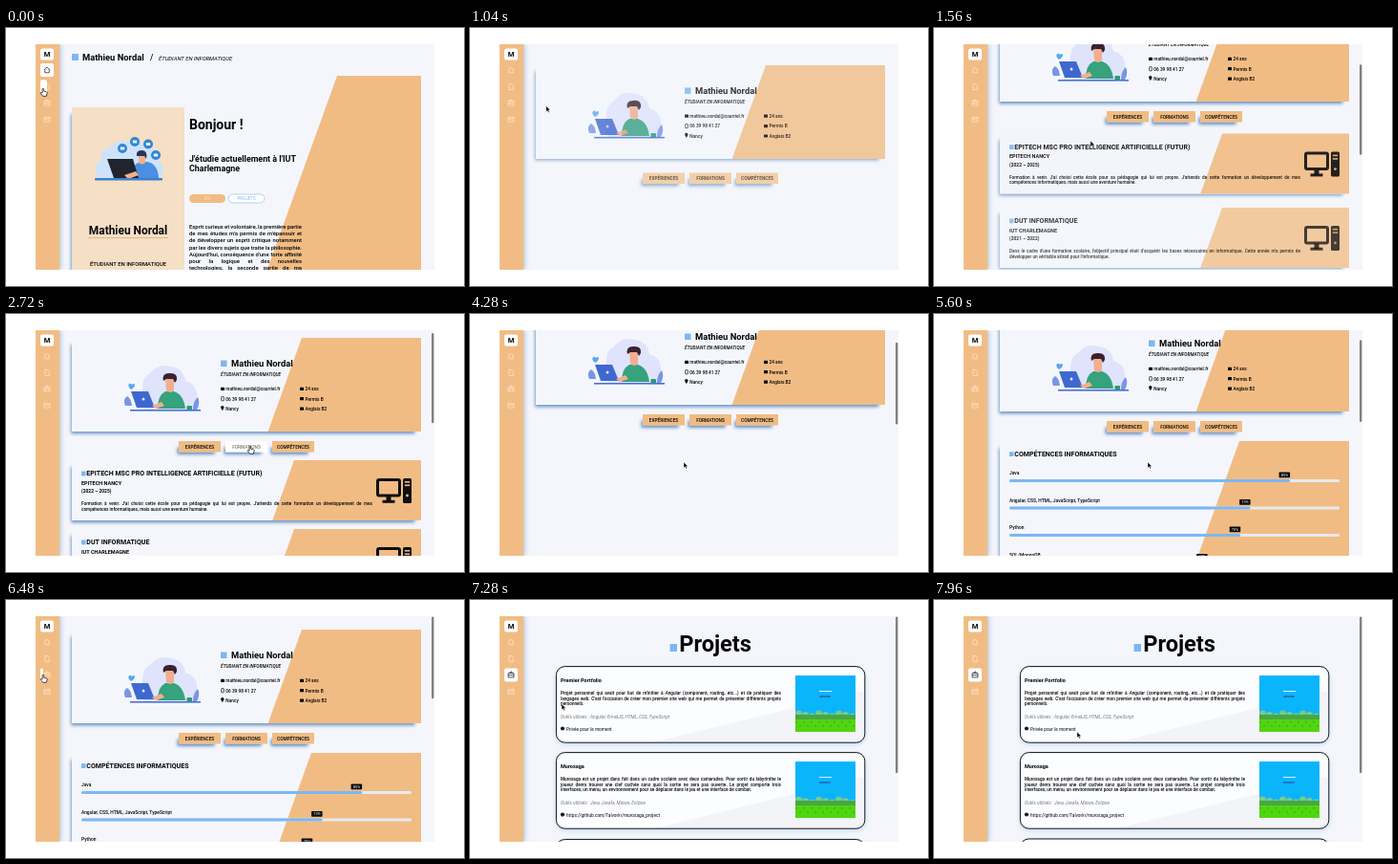
An HTML page with a canvas for the animation above (8 s loop, 480 px wide and 270 px high).

```html
<!DOCTYPE html>
<html lang="fr">
<head>
<meta charset="utf-8">
<title>Portfolio</title>
<style>
  html, body { margin: 0; width: 100%; height: 100%; overflow: hidden; background: #fff; }
  canvas { display: block; width: 480px; height: 270px; }
</style>
</head>
<body>
<canvas id="stage"></canvas>
<script>
const LOOP = 8000;
const ORANGE = '#f1bc83', BLUE = '#7cb7f3', PAPER = '#f4f6fb', INK = '#040506';
const NAME = 'Mathieu Nordal', ROLE = 'ÉTUDIANT EN INFORMATIQUE';
const OPEN_CV = 880, OPEN_SKILLS = 3400, OPEN_PROJECTS = 6800;

const canvas = document.getElementById('stage');
const ctx = canvas.getContext('2d');
const ratio = window.devicePixelRatio || 1;
canvas.width = 480 * ratio;
canvas.height = 270 * ratio;

// Motion: [time, value...] keys joined by smooth steps.
const CURSOR = [[0, 39, 63], [520, 39, 63], [850, 39, 64], [1350, 164, 118], [1700, 164, 118],
  [2450, 256, 138], [2900, 256, 138], [3250, 301, 137], [3500, 301, 137], [4100, 224, 155],
  [5800, 224, 155], [6440, 39, 78], [6950, 39, 78], [7600, 150, 138], [8000, 150, 138]];
const SCROLL = [[0, 0], [1340, 0], [1560, 52], [1700, 52], [2140, 6], [3600, 6], [4240, 34],
  [4400, 34], [4950, 48], [5560, 27], [5640, 27], [6200, 0], [8000, 0]];

const clamp = v => Math.max(0, Math.min(1, v));
const easeOut = p => 1 - (1 - clamp(p)) ** 3;

function track(keys, t) {
  const i = Math.max(1, keys.findIndex(k => k[0] >= t));
  const a = keys[i - 1], b = keys[i];
  const p = clamp((t - a[0]) / (b[0] - a[0]));
  const s = p * p * (3 - 2 * p);
  return a.slice(1).map((v, n) => v + (b[n + 1] - v) * s);
}

// Drawing helpers
function rect(x, y, w, h, color) {
  ctx.fillStyle = color;
  ctx.fillRect(x, y, w, h);
}

function round(x, y, w, h, r, fill, stroke, line = 1) {
  ctx.beginPath();
  ctx.roundRect(x, y, w, h, r);
  if (fill) { ctx.fillStyle = fill; ctx.fill(); }
  if (stroke) { ctx.strokeStyle = stroke; ctx.lineWidth = line; ctx.stroke(); }
}

function shape(path, fill, stroke, line = 1) {
  const p = new Path2D(path);
  if (fill) { ctx.fillStyle = fill; ctx.fill(p); }
  if (stroke) { ctx.strokeStyle = stroke; ctx.lineWidth = line; ctx.stroke(p); }
}

function dot(x, y, r, color) {
  ctx.beginPath();
  ctx.arc(x, y, r, 0, 7);
  ctx.fillStyle = color;
  ctx.fill();
}

function text(str, x, y, size, { style = '400', color = INK, align = 'left' } = {}) {
  ctx.font = `${style} ${size}px Roboto, sans-serif`;
  ctx.fillStyle = color;
  ctx.textAlign = align;
  ctx.fillText(str, x, y);
}

function paragraph(lines, x, y, width, size, leading, openEnd = true) {
  const style = '500';
  lines.forEach((line, i) => {
    const baseline = y + i * leading;
    if (openEnd && i === lines.length - 1) return text(line, x, baseline, size, { style });
    const words = line.split(' ');
    ctx.font = `${style} ${size}px Roboto, sans-serif`;
    const widths = words.map(w => ctx.measureText(w).width);
    const gap = (width - widths.reduce((a, b) => a + b)) / (words.length - 1);
    let left = x;
    words.forEach((w, n) => { text(w, left, baseline, size, { style }); left += widths[n] + gap; });
  });
}

function shadowed(draw, color, dx, dy, blur) {
  ctx.save();
  ctx.shadowColor = color;
  ctx.shadowOffsetX = dx * ratio;
  ctx.shadowOffsetY = dy * ratio;
  ctx.shadowBlur = blur * ratio;
  draw();
  ctx.restore();
}

// A box whose shadow falls to the lower left; nothing is painted beneath it,
// so it stays clean while it fades in.
function raised(x, y, w, h, fill) {
  ctx.save();
  const outside = new Path2D();
  outside.rect(x - 20, y - 20, w + 40, h + 40);
  outside.rect(x, y, w, h);
  ctx.clip(outside, 'evenodd');
  shadowed(() => rect(x, y + 4, w - 5, h - 4, '#86add6'), 'rgba(70,120,180,.8)', -1.5, 2.5, 3.5);
  ctx.restore();
  rect(x, y, w, h, fill);
}

function slant(edge, y, h) {
  shape(`M${edge} ${y}H435V${y + h}H${edge - h * 0.361}Z`, ORANGE);
}

function panel(y, h, edge) {
  raised(69, y, 366, h, PAPER);
  slant(edge, y, h);
}

function fadeUp(t, start, draw) {
  const e = easeOut((t - start) / 400);
  if (e <= 0) return;
  ctx.save();
  ctx.globalAlpha = e;
  ctx.translate(0, 37 * (1 - e));
  draw();
  ctx.restore();
}

// Home
function deskScene() {
  shape('M97 157q-8-12 3-19q-2-11 9-13q6-9 16-6q14-4 22 5q14 2 13 15q8 6 2 18z', '#cfe2fb');
  [[122, 126], [135, 119], [149, 121.5], [157, 133]].forEach(([x, y]) => {
    dot(x, y, 5, '#2f86d6');
    rect(x - 2.2, y - 1.5, 4.4, 3, '#e8f3ff');
  });
  shape('M132 157q0-15 9-17h7q11 2 12 17z', '#4b8fe2');
  shape('M139 133h7v8q-4 3-7 0z', '#f2b08c');
  shape('M137 134q-1-6 5-6q7 0 5 9l-2-3z', '#27355c');
  shape('M106 137h27l6 20h-26z', '#20242f');
  shape('M124 154l12-4 3 4-11 4z', '#f2b08c');
  round(93, 157, 71, 2.5, 1, '#3c7fd0');
}

function home() {
  slant(347, 50, 203);
  rect(69, 27, 7, 7, BLUE);
  text(NAME, 80, 33.7, 9.36, { style: '700' });
  text('/', 151, 33.7, 8.5, { style: '500' });
  text(ROLE, 160, 33.6, 5.87, { style: 'italic 400' });

  raised(69, 83, 118, 180, '#f5dfc5');
  deskScene();
  text(NAME, 128, 216, 11.9, { style: '700', align: 'center' });
  rect(86, 219.4, 84, 0.7, '#d8a56c');
  text(ROLE, 128, 249.2, 5.87, { style: '500', align: 'center' });

  text('Bonjour !', 192, 106, 14, { style: '700' });
  text('J\'étudie actuellement à l\'IUT', 192, 139.6, 8.85, { style: '700' });
  text('Charlemagne', 192, 150.2, 8.85, { style: '700' });
  round(192, 174, 38, 9, 4.5, ORANGE);
  text('CV', 211, 180.2, 4.5, { color: '#fbe8d2', align: 'center' });
  round(233, 174, 38, 9, 4.5, '#fff', BLUE, 0.6);
  text('PROJETS', 252, 180.2, 4.5, { color: BLUE, align: 'center' });
  paragraph(['Esprit curieux et volontaire, la première partie',
    'de mes études m\'a permis de m\'épanouir et',
    'de développer un esprit critique notamment',
    'par les divers sujets que traite la philosophie.',
    'Aujourd\'hui, conséquence d\'une forte affinité',
    'pour la logique et des nouvelles',
    'technologies, la seconde partie de ma'], 192, 210.3, 118, 5.9, 7.07, false);
}

// CV
function studentScene() {
  shape('M146 107q-9-10-3-22q-1-12 8-17q8-11 22-7q13 2 15 15q13 4 12 17q0 8-4 14z', '#dfe4fc');
  shape('M125 102q-3-7 2-10q4 2 5 10zM196 106q0-9 5-13q3 6-1 13z', '#7895e6');
  shape('M131 85q-4-3-2-6 2-1 3 1 2-2 3 0 0 3-4 5z', '#5aa8ee');
  shape('M159 105q0-14 8-18h9q10 3 12 18z', '#35a37c');
  shape('M167 74h9v12q-4 4-8 0z', '#f3ad8f');
  shape('M165 76q-2-8 6-8q9-1 8 7l-2 3-2-4-7 0z', '#3a2230');
  shape('M131 87h18l7 17h-19z', '#3f68cf');
  dot(144, 95, 1.5, '#dbe3fc');
  shape('M153 102l10-4 3 4-9 3z', '#f3ad8f');
  round(189.5, 102, 5.5, 4.5, 1, '#2c9a72');
  rect(130, 106, 74, 1.6, '#4a6fd8');
}

function contactIcon(x, y, tall) {
  if (tall) round(x + 0.7, y - 4, 2.6, 4.2, 0.5, null, INK, 0.7);
  else round(x, y - 3.5, 4, 3.2, 0.5, INK);
}

function identity() {
  panel(31, 98, 310);
  studentScene();
  rect(225, 54.5, 6.5, 6.5, BLUE);
  text(NAME, 236, 61.2, 9.36, { style: '700' });
  text(ROLE, 225, 71, 4.77, { style: 'italic 500' });
  ['mathieu.nordal@courriel.fr', '06 39 98 41 27', 'Nancy'].forEach((line, i) => {
    const y = 86.2 + i * 10.4;
    if (i < 2) contactIcon(225, y, i === 1);
    else shape('M226.8 107.2l-1.6-3a1.7 1.7 0 1 1 3.2 0z', INK);
    text(line, 230.3, y, 4.75, { style: '500' });
  });
  ['24 ans', 'Permis B', 'Anglais B2'].forEach((line, i) => {
    const y = 86.2 + i * 10.4;
    contactIcon(308, y);
    text(line, 313.5, y, 4.75, { style: '500' });
  });
}

function tabs(pointer, scroll) {
  ['EXPÉRIENCES', 'FORMATIONS', 'COMPÉTENCES'].forEach((label, i) => {
    const x = 181 + i * 49;
    const hover = overTab(pointer, scroll, i);
    raised(x, 139, 44, 11.5, hover ? '#fff' : ORANGE);
    text(label, x + 22, 146.5, 4.75, { style: '500', align: 'center', color: hover ? '#85786a' : INK });
  });
}

function overTab([x, y], scroll, i) {
  const left = 181 + i * 49, top = 139 - scroll;
  return x >= left && x <= left + 44 && y >= top && y <= top + 11.5;
}

function computer(x, y) {
  const color = '#0d0e11';
  round(x + 1.5, y + 1.5, 23, 16.5, 1.5, null, color, 3);
  rect(x + 10.5, y + 19, 5, 5, color);
  rect(x + 6.5, y + 22.8, 13, 3, color);
  round(x + 28, y, 9, 26, 1.5, color);
  rect(x + 29.8, y + 3, 5.4, 1.6, ORANGE);
  rect(x + 29.8, y + 6.5, 5.4, 1.6, ORANGE);
  dot(x + 32.5, y + 18, 1.4, ORANGE);
}

function heading(label, y) {
  rect(79, y - 4.8, 4.5, 4.8, BLUE);
  text(label, 84.3, y, 7.05, { style: '700' });
}

function course(y, title, school, years, lines) {
  panel(y, 63, 302);
  heading(title, y + 16.4);
  text(school, 79, y + 25.8, 5.5, { style: '700' });
  text(years, 79, y + 34.2, 4.9, { style: '700' });
  paragraph(lines, 79, y + 47, 305, 4.7, 5.7);
  computer(388, y + 19);
}

function courses(t) {
  fadeUp(t, 1345, () => course(159, 'EPITECH MSC PRO INTELLIGENCE ARTIFICIELLE (FUTUR)',
    'EPITECH NANCY', '(2022 – 2025)',
    ['Formation à venir. J\'ai choisi cette école pour sa pédagogie qui lui est propre. J\'attends de cette formation un développement de mes',
      'compétences informatiques, mais aussi une aventure humaine.']));
  fadeUp(t, 1410, () => course(231, 'DUT INFORMATIQUE', 'IUT CHARLEMAGNE', '(2021 – 2022)',
    ['Dans le cadre d\'une formation scolaire, l\'objectif principal était d\'acquérir les bases nécessaires en informatique. Cette année m\'a permis de',
      'développer un véritable attrait pour l\'informatique.']));
}

function skills() {
  panel(160, 300, 320);
  heading('COMPÉTENCES INFORMATIQUES', 176);
  [['Java', 85], ['Angular, CSS, HTML, JavaScript, TypeScript', 73], ['Python', 70], ['SQL/MongoDB', 60]]
    .forEach(([label, percent], i) => {
      const y = 195.3 + i * 28.5, length = 346 * percent / 100;
      text(label, 79, y, 4.9, { style: '500' });
      round(79, y + 4.6, 346, 3, 1.5, '#e6eaf1');
      round(79, y + 4.6, length, 3, 1.5, BLUE);
      round(79 + length - 11.5, y - 2.7, 11.5, 5.6, 0.6, '#0a0a0c');
      text(percent + '%', 79 + length - 5.7, y + 1.6, 4, { color: '#fff', align: 'center' });
    });
}

function cv(t, pointer, scroll) {
  ctx.save();
  ctx.translate(0, -scroll);
  fadeUp(t, OPEN_CV, identity);
  fadeUp(t, OPEN_CV + 40, () => tabs(pointer, scroll));
  if (t < OPEN_SKILLS) courses(t);
  else fadeUp(t, 4300, skills);
  ctx.restore();
}

// Projects
function landscape(x, y) {
  rect(x, y, 63, 59, '#0ab5fb');
  for (let i = 0; i < 9; i++) dot(x + 3.5 + i * 7, y + 40 + (i % 3) * 1.5, 3.4, '#7cc98c');
  rect(x, y + 41, 63, 6, '#4aa644');
  rect(x, y + 46, 63, 13, '#4fd611');
  for (let i = 0; i < 16; i++) rect(x + i * 4, y + 48 + (i % 2) * 4, 2, 1.5, '#43b514');
  rect(x + 25, y + 16, 13, 1, '#d8f0fb');
  round(x + 25, y + 21, 12, 2, 0.8, '#2f6fc4');
}

function projectCard(y) {
  shadowed(() => round(90.4, y, 323.4, 79.6, 9, '#fcfdff'), 'rgba(100,160,225,.4)', 0, 1.5, 5);
  ctx.save();
  ctx.beginPath();
  ctx.roundRect(90.4, y, 323.4, 79.6, 9);
  ctx.clip();
  shape(`M190 ${y + 80}L414 ${y + 25}V${y + 80}Z`, '#f2f4f8');
  ctx.restore();
  round(90.4, y, 323.4, 79.6, 9, null, '#11141a', 1);
}

function project(y, title, lines, tools, link) {
  projectCard(y + 0.6);
  text(title, 95, y + 17, 5.5, { style: '700' });
  paragraph(lines, 95, y + 30.2, 231, 4.7, 5.6);
  text(tools, 95, y + 54.7, 4.75, { style: 'italic 400', color: '#777' });
  dot(97, y + 65.5, 2.1, '#181b20');
  text(link, 101, y + 67.6, 4.75);
  landscape(341, y + 10);
}

function projects(t) {
  fadeUp(t, OPEN_PROJECTS, () => {
    rect(209.5, 46, 7.5, 8, BLUE);
    text('Projets', 219.2, 54.2, 23.6, { style: '700' });
  });
  fadeUp(t, OPEN_PROJECTS + 60, () => project(69, 'Premier Portfolio',
    ['Projet personnel qui avait pour but de m\'initier à Angular (component, routing, etc...) et de pratiquer des',
      'langages web. C\'est l\'occasion de créer mon premier site web qui me permet de présenter différents projets',
      'personnels.'],
    'Outils utilisés : Angular, EmailJS, HTML, CSS, TypeScript', 'Privée pour le moment'));
  fadeUp(t, OPEN_PROJECTS + 120, () => project(159, 'Murosaga',
    ['Murosaga est un projet dans fait dans un cadre scolaire avec deux camarades. Pour sortir du labyrinthe le',
      'joueur devra trouver une clef cachée sans quoi la sortie ne sera pas ouverte. Le projet comporte trois',
      'interfaces, un menu, un environnement pour se déplacer dans le jeu et une interface de combat.'],
    'Outils utilisés : Java, Javafx, Maven, Eclipse', 'https://github.com/Talvorin/murosaga_project'));
  fadeUp(t, OPEN_PROJECTS + 180, () => projectCard(250));
}

// Browser frame
const ICONS = ['M39.8 44l3.2-2.9 3.2 2.9M40.8 43.4v3.4h4.4v-3.4',
  'M41 58.4h2.8l1.6 1.7v4.5H41z',
  'M40 76.6h6v4.4h-6zM42 76.6v-1.4h2v1.4M40 78.7h6',
  'M40 93.6h6v4.6h-6zM40 93.8l3 2.4 3-2.4'];

function sidebar(t) {
  shadowed(() => rect(31, 17, 25, 236, ORANGE), 'rgba(90,125,170,.5)', 1, 0, 5);
  round(36, 21.5, 14, 12, 2, '#fff');
  text('M', 43, 30.2, 7.6, { style: '700', align: 'center' });
  const fill = [
    t < OPEN_CV ? 1 : 0,
    t < OPEN_CV ? 0.5 + 0.5 * clamp((t - 520) / 120) : 0,
    t > 6440 ? clamp((t - 6440) / 200) : 0,
    0];
  ICONS.forEach((icon, i) => {
    if (fill[i]) round(36, 37 + i * 17.3, 14 * fill[i], 14, 2, '#fff');
    shape(icon, null, fill[i] === 1 ? '#15171c' : 'rgba(255,255,255,.65)', 0.7);
  });
}

function scrollbar(t, scroll) {
  if (t < 1360) return;
  const height = t < OPEN_SKILLS ? 590 : t < OPEN_PROJECTS ? 650 : 340;
  const scale = 236 / height;
  round(446, 17.5 + scroll * scale, 2.4, 236 * scale, 1.2, '#808184');
}

function pointerMark([x, y], hand) {
  ctx.save();
  ctx.translate(x, y);
  if (hand) {
    shape('M-.9 .8q.9-1 1.6 0v2.4l2.8.7q.9.4.6 1.6l-.8 2.8h-3.7l-2.3-3q0-1 1-.8l.8.7z', '#fff', '#000', 0.7);
  } else {
    shape('M0 0v6l1.4-1.2 1 2.2 1-.5-1-2.1h1.9z', '#000', '#fff', 0.4);
  }
  ctx.restore();
}

function draw(t) {
  ctx.setTransform(ratio, 0, 0, ratio, 0, 0);
  rect(0, 0, 480, 270, '#fff');
  ctx.save();
  ctx.beginPath();
  ctx.rect(31, 17, 418, 236);
  ctx.clip();
  rect(31, 17, 418, 236, PAPER);

  const pointer = track(CURSOR, t), [scroll] = track(SCROLL, t);
  const onCv = t >= OPEN_CV && t < OPEN_PROJECTS;
  if (t < OPEN_CV) home();
  else if (onCv) cv(t, pointer, scroll);
  else projects(t);
  sidebar(t);
  scrollbar(t, scroll);
  const hand = pointer[0] < 50 || onCv && [0, 1, 2].some(i => overTab(pointer, scroll, i));
  pointerMark(pointer, hand);
  ctx.restore();
}

const began = performance.now();
function frame() {
  draw((performance.now() - began) % LOOP);
  requestAnimationFrame(frame);
}
frame();
</script>
</body>
</html>
```
